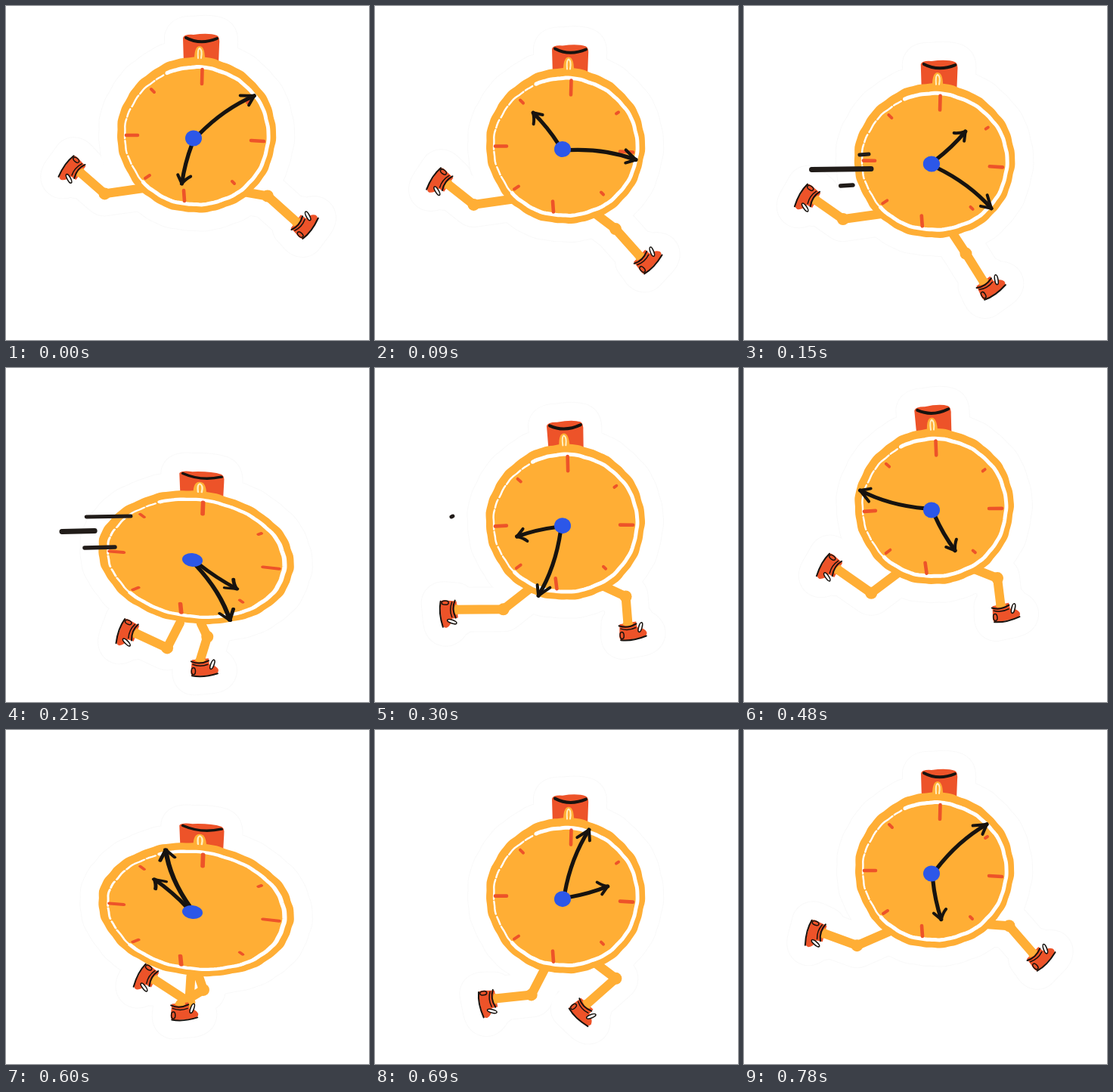
Write an HTML page that moves like this. It is 480x442 px and loops after 0.81 s.

```html
<!DOCTYPE html>
<html lang="en">
<head>
<meta charset="utf-8">
<title>Running clock</title>
<style>
  html, body { margin: 0; width: 100%; height: 100%; overflow: hidden; background: #fff; }
  svg { display: block; width: 100vw; height: 100vh; }
  path, line { stroke-linecap: round; stroke-linejoin: round; }
  .ink { fill: none; stroke: #17130f; }
  .orange { fill: #ffae35; }
  .red { fill: #ed5329; }
  .limb { fill: none; stroke: #ffae35; stroke-width: 12; }
  .tick { fill: none; stroke: #ed5329; }
  .chalk { fill: none; stroke: #fff; }
  .solid { vector-effect: non-scaling-stroke; stroke-width: calc(48px + var(--edge, 0px)); }
  .bone { fill: none; stroke-width: calc(58px + var(--edge, 0px)); }
</style>
</head>
<body>
<svg viewBox="0 0 480 442" aria-label="A clock with legs running">
  <defs>
    <path id="sole" class="solid" d="M-11 0 L11 -2 L12 6 Q21 7 24 13 Q25 19 14 20 L-9 22 Q-14 21 -12 11 Z"/>
    <g id="boot">
      <use href="#sole" class="red"/>
      <ellipse class="orange" rx="7" ry="3"/>
      <path class="ink" stroke-width="2" d="M-12 2 Q-1 7 11 1"/>
      <path class="ink" stroke-width="1.5" d="M-10 6 Q0 10 10 6"/>
      <path class="ink" stroke-width="2" d="M-11 21 Q4 24 23 18"/>
      <ellipse class="ink" stroke-width="1.5" cx="-9" cy="15" rx="2.6" ry="4.5"/>
      <ellipse cx="16" cy="6" rx="2.2" ry="6.5" transform="rotate(20 16 6)" fill="#fff" stroke="#17130f" stroke-width="1.6"/>
    </g>
    <path id="cap" class="solid" d="M-14 -133 Q-12 -138 0 -137 Q20 -140 31 -136 Q35 -134 34 -124 L33 -98 L-13 -98 Z"/>
    <path id="disc" class="solid"/>
    <g id="shape">
      <g class="clock"><g class="face"><use href="#disc"/><use href="#cap"/></g></g>
      <path class="legs bone"/>
      <use href="#sole" class="boot0"/>
      <use href="#sole" class="boot1"/>
    </g>
  </defs>

  <use href="#shape" style="--edge:2px" fill="#f9f9f9" stroke="#f9f9f9"/>
  <use href="#shape" fill="#fff" stroke="#fff"/>

  <path class="legs limb"/>
  <circle class="knee orange" r="8"/>
  <circle class="knee orange" r="8"/>
  <use href="#boot" class="boot0"/>
  <use href="#boot" class="boot1"/>

  <g class="clock">
    <g class="face">
      <use href="#cap" class="red"/>
      <path class="ink" stroke-width="4" d="M-10 -133 Q9 -123 31 -132"/>
      <use href="#disc" class="orange"/>
      <path class="orange" d="M1 -98 Q0 -122 8 -122 Q16 -122 15 -98 Z"/>
      <path class="chalk" style="stroke:#fff0c4" stroke-width="2" d="M6 -106 Q5 -118 8 -119 Q12 -117 10 -106"/>
      <path id="ring" class="chalk" stroke-width="5"/>
      <path id="worn" class="chalk" stroke-width="2.4" stroke-dasharray="26 3 11 4 17 3"/>
      <path class="tick" stroke-width="4.6" d="M11.5 -91 L11 -72 M76 3 L93 4 M-13 69 L-12 83 M-89 -4 L-74 -4"/>
      <path class="tick" stroke-width="4" d="M-56 -65 L-52 -61 M-64 53 L-58 49 M51 57 L54 60 M71 -47 L74 -49"/>
    </g>
    <g id="long" class="ink" stroke-width="5.2">
      <path d="M0 -8 Q-9 -55 0 -98"/>
      <path stroke-width="4" d="M-11 -83 Q-5 -91 0 -98 L6 -85"/>
    </g>
    <g id="short" class="ink" stroke-width="5.2">
      <path d="M0 -8 Q3 -35 0 -62"/>
      <path stroke-width="4" d="M-9 -50 Q-4 -54 0 -62 L8 -52"/>
    </g>
    <ellipse rx="11" ry="10.5" fill="#2c57e8"/>
  </g>
  <g class="ink" style="stroke:#211c19">
    <line class="streak" stroke-width="7"/>
    <line class="streak" stroke-width="5"/>
    <line class="streak" stroke-width="5.5"/>
  </g>
</svg>
<script>
const LOOP = 810, STEP = 30, RAD = Math.PI / 180;
const LANDINGS = [210, 600];

// Key poses: hub height and joint angles (0 = down, positive = forward)
const TIMES = [0, 150, 210, 360, 480, 600, 780];
const HUB_Y = [175, 209, 254, 184, 188, 241, 190];
const LEGS = [
  { knee: [52, 21, 11, -55, -36, -2, 56], shin: [48, 32, -17, -117, -125, -123, 41], size: 38, reach: 24 },
  { knee: [-58, -58, -16, 60, 44, 8, -46], shin: [-131, -125, -115, 63, 7, -59, -110], size: 36, reach: 12 }
];
const STREAKS = [
  { x: 168, y: 216, length: 97, start: 90 },
  { x: 165, y: 196.5, length: 67, start: 138 },
  { x: 144, y: 237.5, length: 44, start: 125 }
];

const all = s => [...document.querySelectorAll(s)];
const set = (el, attrs) => Object.entries(attrs).forEach(([k, v]) => el.setAttribute(k, v));
const place = (els, transform) => els.forEach(el => set(el, { transform }));
const clamp = v => Math.min(1, Math.max(0, v));
const easeOut = v => 1 - (1 - clamp(v)) ** 2;
const polar = (angle, r) => [r * Math.sin(angle * RAD), r * Math.cos(angle * RAD)];

// Smooth looping interpolation without overshoot
function track(values, t) {
  const n = TIMES.length;
  const val = j => values[(j + n) % n];
  const time = j => TIMES[(j + n) % n] + Math.floor(j / n) * LOOP;
  const rate = j => (val(j + 1) - val(j)) / (time(j + 1) - time(j));
  const slope = j => {
    const a = rate(j - 1), b = rate(j);
    return a * b <= 0 ? 0 : 2 * a * b / (a + b);
  };
  const i = TIMES.findLastIndex(k => k <= t);
  const span = time(i + 1) - time(i), u = (t - time(i)) / span;
  const d = val(i + 1) - val(i), m = slope(i) * span, w = slope(i + 1) * span;
  return val(i) + u * (m + u * (3 * d - 2 * m - w + u * (m + w - 2 * d)));
}

// Steady turning that slows down after the second landing
function spin(t, total, speed) {
  const from = LANDINGS[1], rest = LOOP - from;
  if (t < from) return speed * t;
  const u = (t - from) / rest, left = total - speed * from, k = speed * rest;
  return speed * from + k * u + (left - k) * u * u;
}

function squash(t) {
  const near = Math.min(...LANDINGS.map(l => Math.abs(t - l)));
  return Math.cos(clamp(near / 70) * Math.PI / 2) ** 2;
}

// Hand-drawn arc; angles in degrees clockwise from the top
function arc(cx, cy, rx, ry, from, to, wobble) {
  const pts = [];
  for (let a = from; a <= to; a += 2) {
    const r = a * RAD;
    const k = wobble * (Math.sin(r * 13) + Math.sin(r * 31 + 1) * .6 + Math.sin(r * 5 + 2));
    pts.push((cx + (rx + k) * Math.sin(r)).toFixed(1) + ' ' + (cy - (ry + k) * Math.cos(r)).toFixed(1));
  }
  return 'M' + pts.join('L');
}

const [long, short, disc, ring, worn] = ['long', 'short', 'disc', 'ring', 'worn'].map(id => document.getElementById(id));
const clocks = all('.clock'), faces = all('.face'), legPaths = all('.legs');
const knees = all('.knee'), streaks = all('.streak');
const boots = [all('.boot0'), all('.boot1')];

set(disc, { d: arc(4, -4.3, 105, 103, 0, 358, .45) + 'Z' });
set(ring, { d: arc(4, -3, 95, 91, -24, 228, .3) });
set(worn, { d: arc(4, -3, 95, 91, 228, 336, .4) });

function drawLeg(leg, i, t, x, y, q) {
  const knee = track(leg.knee, t), shin = track(leg.shin, t);
  const planted = q * clamp((shin + 90) / 30);
  const radius = 131 - .13 * knee - 12 * q - 14 * planted;
  const length = (leg.size + leg.reach * Math.sin(shin * RAD) ** 2) * (1 - .2 * planted);
  const [hx, hy] = polar(knee * .7, 85);
  const [kx, ky] = polar(knee, radius);
  const [sx, sy] = polar(shin, length);
  set(knees[i], { cx: x + kx, cy: y + ky });
  place(boots[i], `translate(${x + kx + sx} ${y + ky + sy}) rotate(${-shin * (1 - planted)})`);
  return `M${x + hx} ${y + hy}L${x + kx} ${y + ky}l${sx} ${sy}`;
}

function draw(t) {
  const q = squash(t), x = 248 - 1.5 * q, y = track(HUB_Y, t);
  const tilt = -4.6 * Math.max(0, Math.sin(Math.PI * (t - LANDINGS[0]) / (LANDINGS[1] - LANDINGS[0])));
  place(clocks, `matrix(${1 + .23 * q} ${.09 * q} 0 ${1 - .147 * q} ${x} ${y})`);
  place(faces, `rotate(${tilt})`);
  place([long], `rotate(${55 + spin(t, 360, .48)})`);
  place([short], `rotate(${194.5 + spin(t, 1080, 1.407)})`);

  const d = LEGS.map((leg, i) => drawLeg(leg, i, t, x, y, q)).join('');
  legPaths.forEach(p => set(p, { d }));

  STREAKS.forEach((s, i) => {
    const head = s.x - s.length * easeOut((t - s.start) / 100);
    const tail = s.x - s.length * easeOut((t - s.start - 89) / 100);
    const visibility = tail - head > 3 ? 'visible' : 'hidden';
    set(streaks[i], { x1: head + 3, x2: tail, y1: s.y + .5, y2: s.y - .5, visibility });
  });
}

const start = performance.now();
function tick(now) {
  const t = Math.max(0, now - start) % LOOP;
  draw(Math.floor(t / STEP) * STEP);
  requestAnimationFrame(tick);
}
draw(0);
requestAnimationFrame(tick);
</script>
</body>
</html>
```
